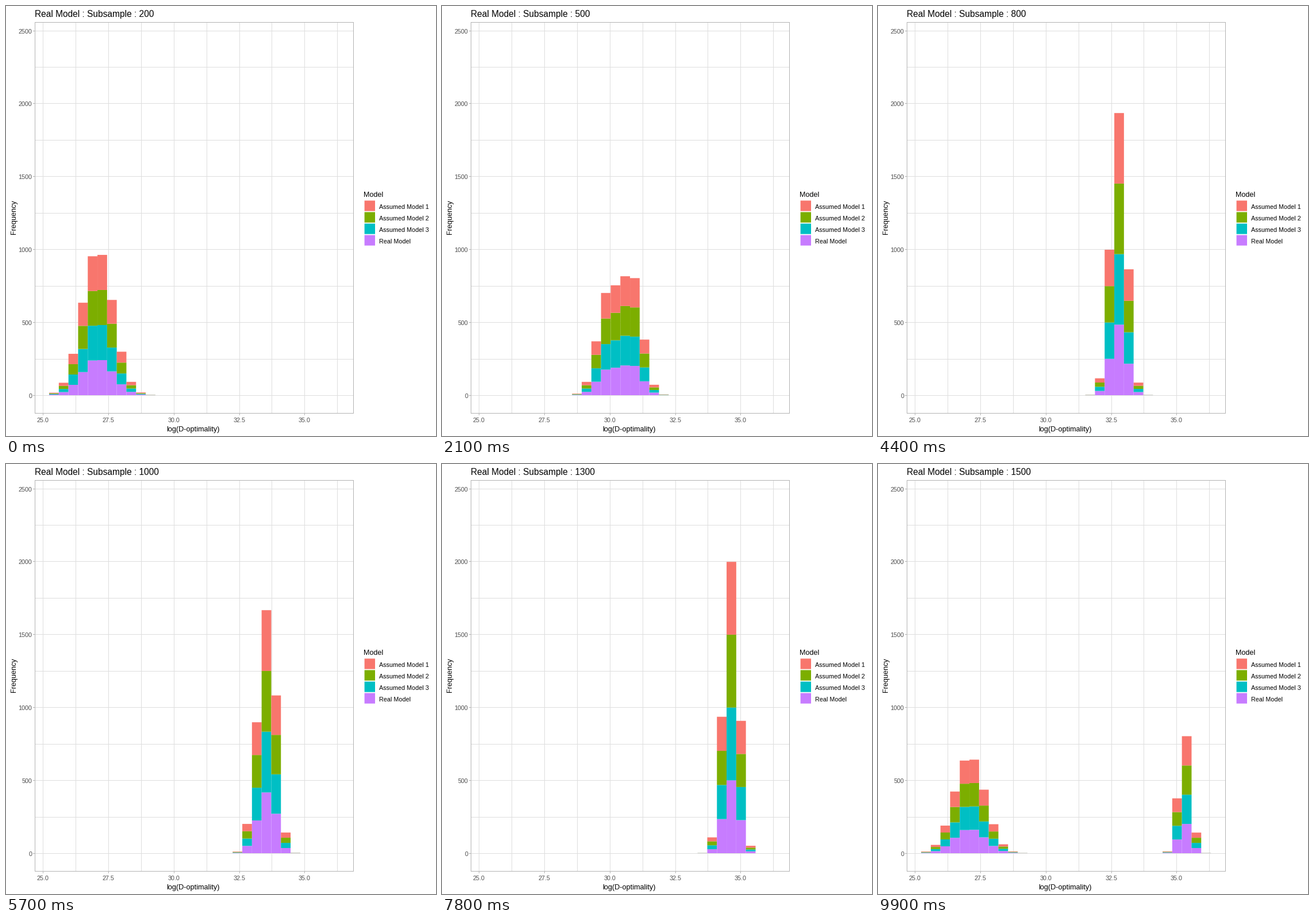
These frames come from a looping animation (748 by 748 pixels, 10000 ms). A matplotlib script:

```python
import math

import matplotlib.pyplot as plt
import numpy as np
from matplotlib.animation import FuncAnimation
from matplotlib.patches import Rectangle

SIZE, DPI = 748, 100
FRAMES, STEP_MS = 100, 100
BINS, BIN_X, BIN_W = 30, 75.05, 16.8
BASE_Y, PX_PER_COUNT = 677, 0.2538
GRID, EDGE, TICK_TEXT = "#DEDEDE", "#B3B3B3", "#4D4D4D"
MODELS = [
    ("Assumed Model 1", "#F8766D"),
    ("Assumed Model 2", "#7CAE00"),
    ("Assumed Model 3", "#00BFC4"),
    ("Real Model", "#C77CFF"),
]
RUNS_PER_MODEL = 1000
SAMPLES = range(200, 1600, 100)
# Frame where each transition begins; the first three take four steps.
STARTS = [*range(4, 28, 8), *range(28, 99, 7)]

plt.rcParams["font.family"] = "Liberation Sans"


def bin_counts(n):
    """Expected runs per bin: the mean grows with log n, the spread shrinks."""
    ratio = n / 200
    growth = math.log(ratio)
    mean = 5.025 + (11.28 - 0.11 * growth) * growth
    spread = 1.56 * ratio ** -0.51
    cdf = [0.5 * (1 + math.erf((i - mean) / spread / math.sqrt(2)))
           for i in range(BINS + 1)]
    return RUNS_PER_MODEL * np.diff(cdf)


STATES = [bin_counts(n) for n in SAMPLES]

fig = plt.figure(figsize=(SIZE / DPI, SIZE / DPI), dpi=DPI, facecolor="white")
ax = fig.add_axes([0, 0, 1, 1])
ax.set_xlim(0, SIZE)
ax.set_ylim(SIZE, 0)
ax.axis("off")


def box(x, y, w, h, color, z=1, smooth=False):
    return ax.add_patch(Rectangle((x, y), w, h, facecolor=color, linewidth=0,
                                  antialiased=smooth, snap=not smooth, zorder=z))


def label(x, y, text, px, color="black", va="baseline", **kw):
    return ax.text(x, y, text, fontsize=px * 72 / DPI, color=color, va=va, **kw)


def draw_panel():
    for k in range(10):
        x = round(64.4 + 56.87 * k)
        box(x, 29, 1, 679, GRID)
        if k % 2 == 0:
            box(x, 709, 1, 3, EDGE)
            label(x + 0.3, 724, f"{25 + 1.25 * k:.1f}", 10.8, TICK_TEXT, ha="center")
    for k in range(11):
        y = int(677.55 - 63.45 * k)
        box(51, y, 553, 1, GRID)
        if k % 2 == 0:
            box(47, y, 3, 1, EDGE)
            label(45.3, y + 5, str(250 * k), 10.8, TICK_TEXT, ha="right")
    for x in (50, 604):
        box(x, 28, 1, 681, EDGE, 4)
    for y in (28, 708):
        box(50, y, 555, 1, EDGE, 4)
    label(325.5, 740, "log(D-optimality)", 12.65, ha="center")
    label(20.5, 366.8, "Frequency", 12.65, rotation=90, ha="right", va="center")


def draw_legend():
    label(622.5, 332, "Model", 12.6)
    for i, (name, color) in enumerate(MODELS):
        box(623.6, 338.5 + 20 * i, 18.4, 18.2, color, smooth=True)
        label(648.6, 353 + 20 * i, name, 10.8)


draw_panel()
draw_legend()
title = label(50, 19, "", 15.5)
bars = [[box(BIN_X + BIN_W * i, BASE_Y, BIN_W, 0, color, 3, smooth=True)
         for _, color in reversed(MODELS)] for i in range(BINS)]


def locate(frame):
    """Index of the state left behind, progress to the next, index for the title."""
    begun = [i for i, start in enumerate(STARTS) if frame >= start]
    if not begun:
        return 0, 0.0, 0
    i = begun[-1]
    step = frame - STARTS[i] + 1
    progress = min(1.0, step / (4 if i < 3 else 3))
    shown = min(i + (step > 1), len(STATES) - 1)
    return i, progress, shown


def update(frame):
    i, t, shown = locate(frame)
    counts = (1 - t) * STATES[i] + t * STATES[(i + 1) % len(STATES)]
    for column, height in zip(bars, counts * PX_PER_COUNT):
        for level, bar in enumerate(column, 1):
            bar.set_y(BASE_Y - level * height)
            bar.set_height(height)
            bar.set_visible(height > 0.1)
    title.set_text(f"Real Model : Subsample : {SAMPLES[shown]}")
    return [title]


anim = FuncAnimation(fig, update, frames=FRAMES, interval=STEP_MS,
                     init_func=lambda: update(0), repeat=True,
                     repeat_delay=0, blit=False)
plt.show()
```
